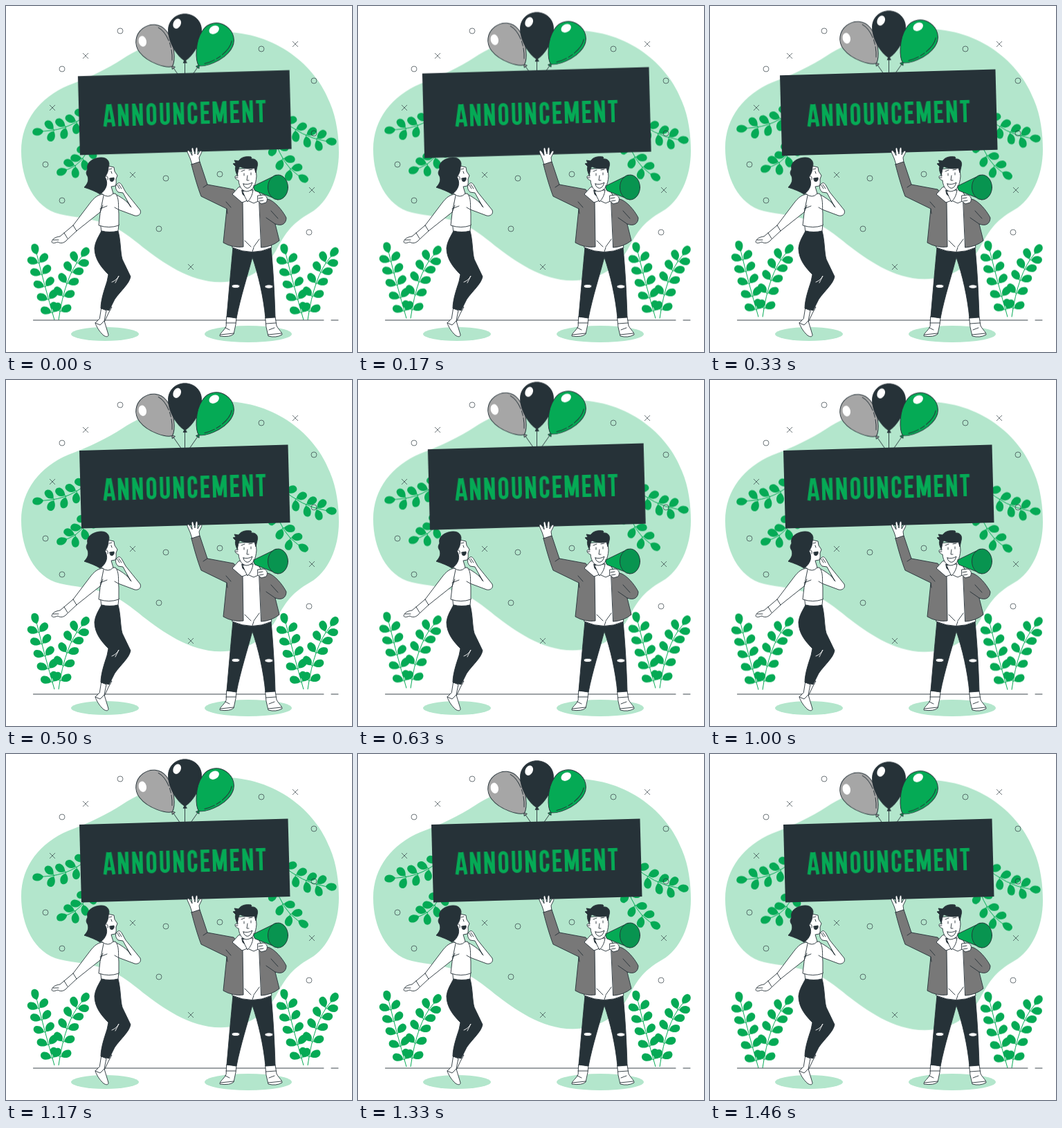
An HTML page that plays this animation: 500x500 px, repeating every 1.5 s.

```html
<!DOCTYPE html>
<html lang="en">
<head>
<meta charset="utf-8">
<title>Announcement</title>
<style>
  html, body { margin: 0; width: 100%; height: 100%; overflow: hidden; background: #fff; }
  svg { display: block; width: 100vw; height: 100vh; }
  .float { animation: float 1.5s linear -20ms infinite; }
  .beat { animation: beat 1.5s linear -20ms infinite; transform-origin: 258.3px 154px; }
  @keyframes float { 50% { transform: translateY(-10px); } }
  @keyframes beat {
    0%, 30%, 40%, 60%, 100% { transform: scale(1); }
    10%, 50% { transform: scale(1.1); }
  }
  .mint { fill: #b3e6cc; }
  .green { fill: #05aa55; }
  .dark { fill: #263238; }
  .grey { fill: #787878; }
  .skin { fill: #fff; }
  .ink { stroke: #263238; stroke-width: .9; stroke-linejoin: round; stroke-linecap: round; }
  .line { fill: none; }
  #marks { fill: none; stroke: #263238; stroke-width: .65; }
  #word { fill: none; stroke: #05aa55; stroke-width: 4.8; }
</style>
</head>
<body>
<svg viewBox="0 0 500 500">
  <path class="mint float" d="M22 210C22 165 50 132 90 115C122 103 146 91 168 77C203 54 250 39 305 38C387 35 447 85 468 140C478 163 481 190 481 212C481 250 465 285 440 299C410 316 402 332 390 354C372 384 345 399.300 310 399.300C264 399 226 370 198 349C181 335 165 323 150 317C125 307 100 306 78 301C40 292 22 250 22 210Z"/>
  <g id="plants" class="float"></g>
  <g id="marks"></g>
  <path class="ink line" d="M39.500 454H459M470 454H480"/>
  <ellipse class="mint" cx="143" cy="474" rx="49" ry="10"/>
  <ellipse class="mint" cx="350" cy="474" rx="63" ry="12"/>

  <g id="balloons" class="float"></g>
  <path class="beat dark" d="M106 102L407.500 93.500L410.500 206L109 214.500Z"/>
  <g id="word" role="img" transform="translate(140.300 174.300) rotate(-1.600)"></g>

  <g id="woman" class="ink">
    <path class="skin" d="M146 437L153 435L148 444L141 459L135 455Z"/>
    <path class="skin" d="M138 437L145 440L142 455L148 475C148 479 144 478 141 476C135 471 130 462 129 458L135 452Z"/>
    <path class="line" d="M129 458L136 461L142 455"/>
    <path class="dark" d="M138 325L162 325C166 340 165 355 168 366L180 391C178 402 166 411 157 424L149 440L137 437C137 425 142 410 146 398L148 388C138 378 128 366 128 350C129 340 134 333 138 325Z"/>
    <path class="line" style="stroke:#fff" d="M153 399C158 397 161 394 163 390L158 400"/>
    <path class="skin" d="M137 315L163 315L162 325Q150 328 138 325Z"/>
    <path class="skin" d="M158 272C170 278 178 285 180 290L169 270L162 269C157 264 158 259 161 257C163 254 166 256 168 260L173 269L194 295C196 301 191 304 186 303L162 294Z"/>
    <path class="skin" d="M140 272L158 271C164 277 162 289 163 300L163 317Q149 322 134 317L136 300Z"/>
    <path class="skin" d="M141 272C131 272 125 280 119 288L97 317L78 333C70 334 67 337 66 341C68 344 71 342 75 341C79 344 85 342 87 339L102 325L136 298Z"/>
    <path class="line" d="M97 317L102 325M84 328L89 336M136 298L140 288M136 293L146 289M162 294L157 291M68 338L76 338M175 282L181 291"/>
    <path class="skin" d="M136 258L138 271Q148 279 155 271L152 261L158 260C160 256 159 253 159 250L161 245L157 239L156 233L147 231L137 244Z"/>
    <path class="dark" d="M118 236C115 225 128 219 138 219C147 219 151 226 148 233C148 239 146 243 143 247C148 255 146 265 136 272C130 268 122 265 113 262C118 257 120 252 118 246C115 242 116 239 118 236Z"/>
    <path class="dark" d="M150 249L156 248C157 252 154 255 151 253Z"/>
    <path class="line" d="M152 239L153 242M149 236L153 235M144 246Q148 245 147 251"/>
    <path class="line" d="M161 259L164 264M163 258L167 264"/>
  </g>

  <g id="man" class="ink">
    <path class="skin" d="M319 449L333 450L332 460L329 474Q324 479 309 477C309 472 315 470 318 463Z"/>
    <path class="skin" d="M375 450L389 449L391 462C394 468 399 471 399 475Q390 480 379 477L376 464Z"/>
    <path class="line" d="M318 458H332M376 459L390 458M317 465L323 468M380 468L388 465M310 475L329 473M379 475L398 473"/>
    <path class="dark" d="M328 349H383C386 380 388 415 389 450L375 451C372 420 365 390 356 363C349 390 339 420 333 451L319 449C322 415 325 380 328 349Z"/>
    <ellipse class="skin" cx="332" cy="405" rx="6" ry="2.700"/>
    <ellipse class="skin" cx="380" cy="405.500" rx="6" ry="2.700"/>
    <path class="skin" d="M336 276L368 278L384 349Q356 362 327 349Z"/>
    <path class="line" d="M345 339L354 348M366 337L358 348M358 349L356 355"/>
    <path class="skin" d="M269 229L266 220L262 211C262 208 264 208 266 211L269 216L268 207C268 204 271 204 271 207L273 214L274 206C275 203 277 204 277 207L277 215L280 210C282 208 284 210 282 213L279 219L280 226Z"/>
    <path class="grey" d="M268 229L280 225L291 258L329 265L342 281L343 348Q328 350 314 342L319 293L282 275C277 262 272 245 268 229Z"/>
    <path class="grey" d="M366 281L378 279C388 281 400 296 405 306C405 314 399 319 389 315L395 339Q384 348 369 349Z"/>
    <path class="line" d="M319 293L320 300M318 283L325 291M291 258L285 262M389 315L376 306M383 296L393 307"/>
    <path class="skin" d="M336 262L327 272L341 284L349 281L358 285L371 279L362 262Z"/>
    <path class="dark" d="M341 266L357 266L349 279L342 272Z"/>
    <path class="skin" d="M342 268Q345 276 349 283Q356 276 357 266Z"/>
    <path class="skin" d="M334 236L335 246C330 243 329 250 336 252C337 262 342 268 348 268C357 267 361 259 362 246L361 234Z"/>
    <path class="dark" d="M334 244C331 238 331 234 332 232L328 228L332 227L330 223L336 224C340 218 347 217 354 218C355 219 355 220 354 221C362 220 365 226 363 232L361 241L359 234C352 236 344 235 338 232C335 235 336 240 334 244Z"/>
    <path class="skin" d="M343 257Q350 259 356 255Q353 265 347 263Q343 261 343 257Z"/>
    <path class="line" d="M344 242V245M354 241V244M340 239L345 237M351 237L356 236M349 245L348 252L351 252M332 248L335 248"/>
    <path class="green" d="M358 260L391 244L393 280L360 267Q357 264 358 260Z"/>
    <ellipse cx="393" cy="262" rx="14.500" ry="18" fill="#089450"/>
    <path class="skin" d="M364 274L372 273C377 274 379 279 376 284L369 286L364 282Z"/>
    <path class="line" d="M365 278L371 277M366 282L372 281"/>
  </g>
</svg>

<script>
const $ = id => document.getElementById(id);
const add = (id, markup) => $(id).insertAdjacentHTML('beforeend', markup);

// Scattered circles and crosses
[[165, 36], [81, 91], [369, 62], [445, 108], [57, 229], [81, 281], [231, 249],
 [309, 243], [221, 322], [438, 327], [445, 184]]
  .forEach(([x, y]) => add('marks', `<circle cx="${x}" cy="${y}" r="4"/>`));
[[115, 72], [418, 55], [67, 147], [183, 244], [442, 266], [267, 377]]
  .forEach(([x, y]) => add('marks', `<path d="M${x - 4} ${y - 4}l8 8m0-8l-8 8"/>`));

// A quadratic stem with leaf pairs and one leaf at the tip
function sprig([x0, y0, cx, cy, x1, y1], pairs) {
  const leaf = (x, y, angle, side) =>
    `<path class="green" transform="translate(${x} ${y}) rotate(${angle}) scale(1 ${side})"
      d="M0-.4L2-.4C5-6 11-7.500 16-4.500C19-2 18 3 14 4.500C10 6 5 4 2 .4L0 .4Z"/>`;
  const at = (a, b, c, t) => (1 - t) ** 2 * a + 2 * t * (1 - t) * b + t * t * c;
  const slope = (a, b, c, t) => (1 - t) * (b - a) + t * (c - b);
  let out = `<path d="M${x0} ${y0}Q${cx} ${cy} ${x1} ${y1}" fill="none" stroke="#05aa55"/>`;
  for (let i = 0; i <= pairs; i++) {
    const t = i === pairs ? 1 : .1 + .96 * i / pairs;
    const x = at(x0, cx, x1, t), y = at(y0, cy, y1, t);
    const dir = Math.atan2(slope(y0, cy, y1, t), slope(x0, cx, x1, t)) * 180 / Math.PI;
    const spread = i === pairs ? [0] : [-58, 58];
    for (const a of spread) out += leaf(x, y, dir + a, a < 0 ? -1 : 1);
  }
  return out;
}
const bush = sprig([70, 454, 55, 402, 45, 361], 5) + sprig([76, 454, 85, 391, 108, 364], 5);
add('plants', `<g>${bush}</g><g transform="translate(360)">${bush}</g>`
  + sprig([122, 152, 95, 179, 56, 181], 4)
  + sprig([122, 200, 111, 229, 90, 236], 3)
  + sprig([397, 163, 428, 190, 460, 195], 4)
  + sprig([389, 195, 400, 230, 421, 244], 3));

// Balloons hang from their knots
[[241, 88.3, -38, 1.03, '#a6a6a6', 18], [258.5, 80.3, 0, 1, '#263238', 0], [278, 87.3, 35, 1.03, '#05aa55', -18]]
  .forEach(([x, y, tilt, size, fill, lean]) => add('balloons', `
    <path class="ink line" d="M${x} ${y}l${lean} 26"/>
    <g class="ink" transform="translate(${x} ${y}) rotate(${tilt}) scale(${size})">
      <path fill="${fill}" d="M0-2L-2.500 2H2.500Z"/>
      <path fill="${fill}" d="M0-1C-8-4-24-25-24-45C-24-59-13-68.500 0-68.500C13-68.500 24-59 24-45C24-25 8-4 0-1Z"/>
      <path class="line" stroke-dasharray="24 3 7 3 30" d="M18-56C24-42 16-20 5-8"/>
      <ellipse class="skin" stroke="none" cx="-11.300" cy="-54.500" rx="5.500" ry="7.500" transform="rotate(25 -11.300 -54.500)"/>
    </g>`));

// Condensed sign lettering: advance width and pen path per letter
const glyphs = {
  A: [18.5, 'M2.8 0L8-32M15.7 0L10.500-32M4.500-8.200H14'],
  N: [18.8, 'M4.200 0V-32M14.600 0V-32M4.700-30L14.100-2'],
  O: [17.7, 'M4.200-24.500C4.200-31.200 13.500-31.200 13.500-24.500V-7.500C13.500-.8 4.200-.8 4.200-7.500Z'],
  U: [17.6, 'M4.100-32V-7.500C4.100-.8 13.500-.8 13.500-7.500V-32'],
  C: [17.1, 'M13.200-20.500V-24.500C13.200-31.200 4.200-31.200 4.200-24.500V-7.500C4.200-.8 13.200-.8 13.200-7.500V-12'],
  E: [15.8, 'M14.600-29.700H4.200V-2.300H14.600M4.200-16.300H13.200'],
  M: [23.4, 'M4 0V-32M19.400 0V-32M5.200-31L11.700-3L18.200-31'],
  T: [15.8, 'M1-29.700H14.800M7.900-29.700V0']
};
const word = 'ANNOUNCEMENT';
let pen = 0;
$('word').setAttribute('aria-label', word);
for (const letter of word) {
  const [advance, d] = glyphs[letter];
  add('word', `<path stroke-miterlimit="2" transform="translate(${pen})" d="${d}"/>`);
  pen += advance + 1.78;
}
</script>
</body>
</html>
```
